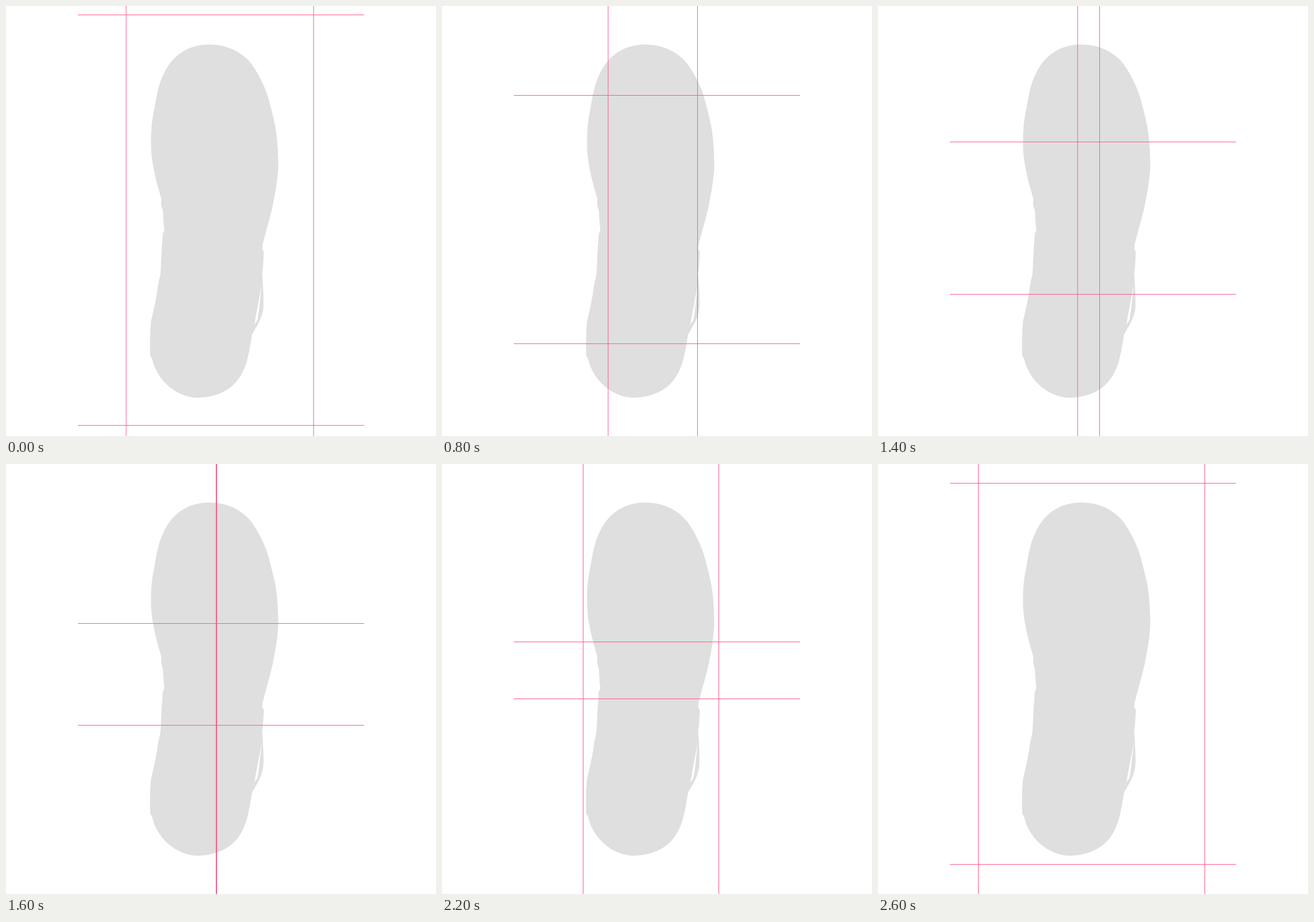
Write an HTML page with a canvas that moves like this. It is 748 px wide and 748 px high and loops after 2800 ms.

```html
<!DOCTYPE html>
<html lang="en">
<head>
<meta charset="utf-8">
<title>Sole with guides</title>
<style>
  html, body { margin: 0; width: 100%; height: 100%; overflow: hidden; background: #fff; }
  canvas { display: block; }
</style>
</head>
<body>
<canvas id="stage" width="748" height="748"></canvas>
<script>
const ctx = document.getElementById("stage").getContext("2d");
const SIZE = 748, STEP = 200, STEPS = 14;
const PINK = "#ff5886", GREY = "#dfdfdf", WHITE = "#fff";

const sole = new Path2D(`M354 67
  C380 67 402 76 419 92 C432 104 443 126 452 147
  C458 163 464 190 468 207 C472 228 474 258 473.5 283
  C472 306 468 328 463 352 C458 373 450 400 446 417
  L446 424 L448.5 427 L447 456 L445.5 464 L447 485
  C447.5 500 448.5 515 447.5 526 C445 547 433 561 428 572
  C425 590 421 620 411 638 C396 667 370 680 333 681.5
  C298 681 262 652 254 613 L251 609
  C250 590 250.5 570 252 550 C256 532 262 507 264 490
  C264.5 483 268 472 269 463 C270 440 270.5 425 272 408
  C272 400 273 393 275.5 391 C274 378 273.5 368 273 357
  C270 347 269 345 270.5 336 C264 314 254 280 252.5 250
  C252 225 252.5 208 256 190 C261 163 264 138 274 119
  C288 88 314 67 354 67 Z`);
const slit = new Path2D("M445 484 L436 532 L432 554 L437.5 546 L440 530 Z");

const clamp01 = v => Math.max(0, Math.min(1, v));
const ramp = (step, from, to) => clamp01((step - from) / (to - from));

// Guides close in at a steady nudge, with a few longer moves, then open again.
const left = s => 208.5 + 120 * ramp(s, 0, 6) + 36.5 * ramp(s, 6, 8)
  - 120 * ramp(s, 8, 11) - 71 * ramp(s, 11, 13);
const right = s => 534.5 - 160 * ramp(s, 0, 8) - 10.5 * ramp(s, 2, 4) + 2 * ramp(s, 6, 8)
  + 115 * ramp(s, 8, 11) + 87 * ramp(s, 11, 13);
const top_ = s => 15 + 39 * ramp(s, 0, 2) + 101 * ramp(s, 2, 4) + 39 * ramp(s, 4, 6)
  + 166 * ramp(s, 6, 10) - 51 * ramp(s, 10, 11) - 276 * ramp(s, 11, 13);
const bottom = s => 729 - 39 * ramp(s, 0, 2) - 103 * ramp(s, 2, 4) - 39 * ramp(s, 4, 6)
  - 188 * ramp(s, 6, 10) + 48 * ramp(s, 10, 11) + 288 * ramp(s, 11, 13);

function paint(color, path) {
  ctx.fillStyle = color;
  ctx.fill(path);
}

function draw(step) {
  ctx.fillStyle = WHITE;
  ctx.fillRect(0, 0, SIZE, SIZE);
  paint(GREY, sole);
  paint(WHITE, slit);
  ctx.fillStyle = PINK;
  for (const x of [left, right]) ctx.fillRect(x(step), 0, 1, SIZE);
  for (const y of [top_, bottom]) ctx.fillRect(125, Math.round(y(step)), 498, 1);
}

const start = performance.now();
function tick() {
  draw(Math.floor((performance.now() - start) / STEP) % STEPS);
  requestAnimationFrame(tick);
}
tick();
</script>
</body>
</html>
```
